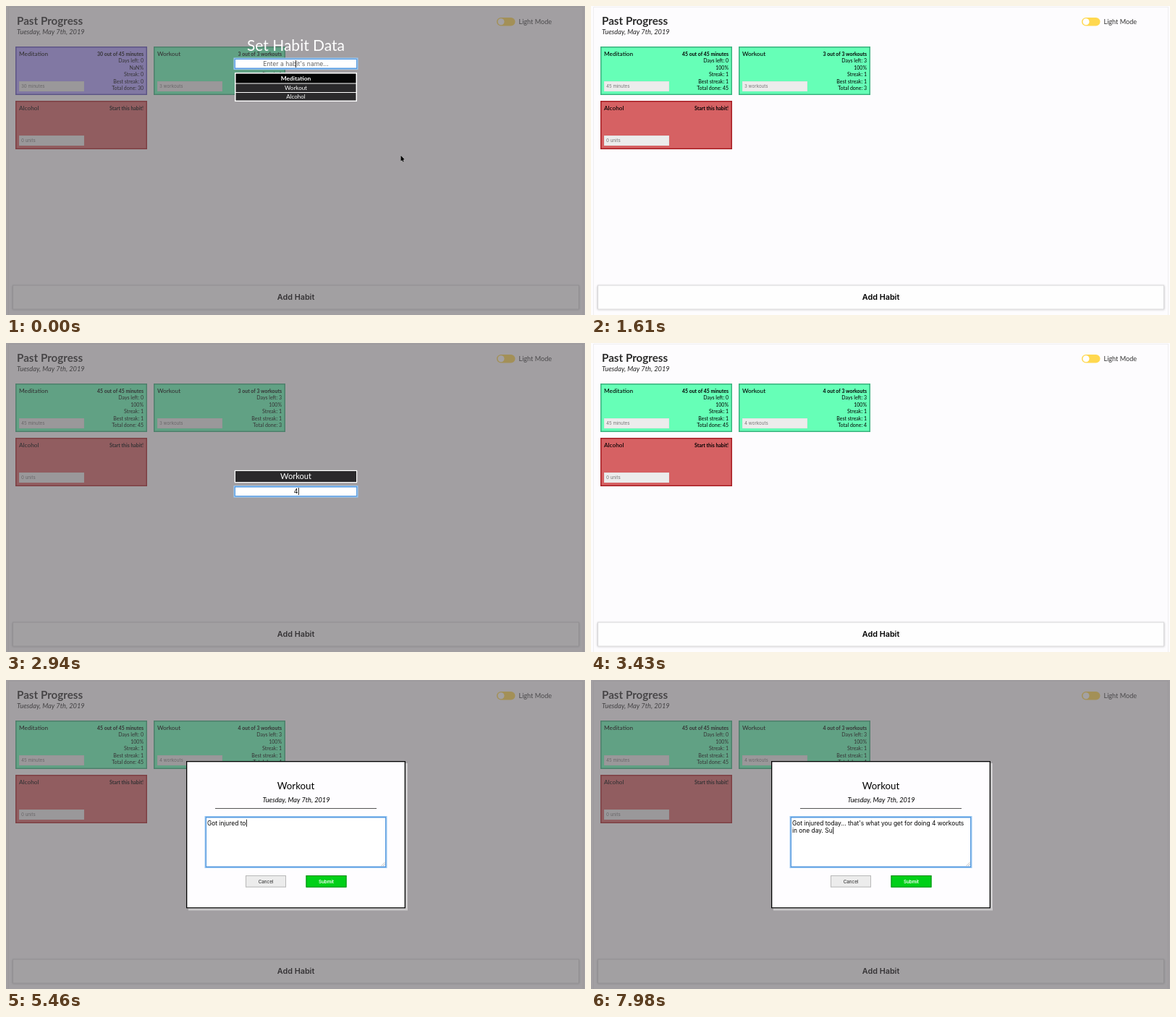
An HTML page with a canvas for the animation above (8000 ms loop, 800 px wide and 427 px high).

```html
<!DOCTYPE html>
<html lang="en">
<head>
<meta charset="utf-8">
<title>Habit tracker</title>
<style>
html, body { margin: 0; width: 100%; height: 100%; overflow: hidden; background: #fdfcfe; }
canvas { display: block; }
</style>
</head>
<body>
<canvas id="stage" width="800" height="427"></canvas>
<script>
const ctx = document.getElementById('stage').getContext('2d');
const LOOP = 8000;
const HEAD = 'Lato, sans-serif', UI = 'Inter, sans-serif';
const DATE = 'Tuesday, May 7th, 2019';
const NOTE = "Got injured today... that's what you get for doing 4 workouts\nin one day. Su";
const GREEN = [102, 255, 183], GREEN_EDGE = [58, 178, 126];
const PURPLE = [176, 160, 255], PURPLE_EDGE = [92, 78, 186];
const RED = [214, 97, 99], RED_EDGE = [168, 30, 36];

const ramp = (t, from, to) => Math.min(1, Math.max(0, (t - from) / (to - from)));
const mix = (a, b, k) => a.map((v, i) => v + (b[i] - v) * k);
const rgb = c => `rgb(${c.map(Math.round)})`;

function text(str, x, y, size, { font = HEAD, style = '', color = '#000', align = 'left' } = {}) {
  ctx.font = `${style} ${size}px ${font}`;
  ctx.fillStyle = color;
  ctx.textAlign = align;
  ctx.fillText(str, x, y);
}

function box(x, y, w, h, fill, edge, line = 1) {
  if (fill) {
    ctx.fillStyle = fill;
    ctx.fillRect(x, y, w, h);
  }
  if (edge) {
    ctx.strokeStyle = edge;
    ctx.lineWidth = line;
    ctx.strokeRect(x + line / 2, y + line / 2, w - line, h - line);
  }
}

function card(x, y, name, fill, edge, amount, lines) {
  box(x, y, 182, 67, rgb(fill), rgb(edge), 1.5);
  text(name, x + 5, y + 13, 8.25, { style: '500' });
  lines.forEach((s, i) => text(s, x + 177, y + 12.7 + i * 9.5, i ? 7 : 6.9,
    { style: i ? '' : 'bold', align: 'right' }));
  box(x + 5, y + 48, 90, 14, '#ececec', '#dedede', 0.5);
  text(amount, x + 8, y + 57.3, 6.2, { font: UI, color: '#777' });
}

const stats = (done, goal, unit, left, percent, streak) => [
  `${done} out of ${goal} ${unit}`, `Days left: ${left}`, `${percent}%`,
  `Streak: ${streak}`, `Best streak: ${streak}`, `Total done: ${done}`];

function page(t) {
  ctx.fillStyle = '#fdfcfe';
  ctx.fillRect(0, 0, 800, 427);
  ctx.strokeStyle = '#efeef0';
  ctx.lineWidth = 1;
  ctx.strokeRect(3.5, 1.5, 794, 440);

  text('Past Progress', 15, 25.7, 15.2, { style: 'bold', color: '#2c2c2c' });
  text(DATE, 15, 39, 9.25, { style: 'italic', color: '#222' });

  ctx.fillStyle = '#ffd84f';
  ctx.beginPath();
  ctx.roundRect(678, 16, 25.5, 11.5, 5.75);
  ctx.fill();
  ctx.fillStyle = '#fff';
  ctx.beginPath();
  ctx.arc(684, 21.7, 4.5, 0, 7);
  ctx.fill();
  text('Light Mode', 708.5, 24.7, 9.1, { color: '#333' });

  const k = ramp(t, 1400, 1610), met = t >= 1470;
  const minutes = met ? 45 : 30, workouts = t >= 3220 ? 4 : 3;
  card(13, 56, 'Meditation', mix(PURPLE, GREEN, k), mix(PURPLE_EDGE, GREEN_EDGE, k), `${minutes} minutes`,
    stats(minutes, 45, 'minutes', 0, met ? 100 : 'NaN', met ? 1 : 0));
  card(204, 56, 'Workout', GREEN, GREEN_EDGE, `${workouts} workouts`,
    stats(workouts, 3, 'workouts', 3, 100, 1));
  card(13, 131, 'Alcohol', RED, RED_EDGE, '0 units', ['Start this habit!']);

  ctx.shadowColor = 'rgba(0,0,0,.25)';
  ctx.shadowBlur = 3;
  box(9, 385.5, 783, 34, '#fefefe');
  ctx.shadowColor = 'transparent';
  box(9, 385.5, 783, 34, null, '#d8d7d9');
  text('Add Habit', 400.5, 406, 10.8, { font: UI, style: '600', align: 'center' });
}

function focusBox(x, y, w, h) {
  box(x - 1, y - 1, w + 2, h + 2, '#9cc9f3');
  box(x, y, w, h, '#fff', '#5599df', 1.5);
}

function caret(x, y) {
  ctx.fillStyle = '#222';
  ctx.fillRect(x, y, 1, 10);
}

function habitList(selected) {
  text('Set Habit Data', 400.5, 62, 21, { color: '#fff', align: 'center' });
  focusBox(315.5, 72.5, 170, 14.5);
  text("Enter a habit's name...", 400.5, 82.8, 8.6, { font: UI, color: '#666', align: 'center' });
  caret(400, 75);
  box(316, 92, 169, 40, '#fff');
  ['Meditation', 'Workout', 'Alcohol'].forEach((name, i) => {
    const on = i === selected, top = [93.5, 107.5, 120][i], bottom = [106.5, 119, 130.5][i];
    box(317.5, top, 166, bottom - top, on ? '#050505' : '#2a292b');
    text(name, 400.5, (top + bottom) / 2 + 3, on ? 8.4 : 8,
      { style: on ? 'bold' : '', color: '#fff', align: 'center' });
  });
}

function amountEntry(name, value) {
  box(315.5, 175.5, 170, 18, '#2a292b', '#fff', 1.5);
  text(name, 400.5, 188, 11.1, { color: '#fff', align: 'center' });
  focusBox(315.5, 198, 170, 14.5);
  text(value, 400.5, 208.4, 8.8, { font: UI, align: 'center' });
  caret(401 + ctx.measureText(value).width / 2, 200);
}

function noteDialog(t) {
  const added = t < 4870, top = added ? 105 : 112, gap = added ? 13.5 : 0;
  const height = 203.5 + gap, area = top + 77 + gap, buttons = top + 158 + gap;
  box(252, top + 3, 303, height, '#cac8ca');
  box(249, top, 303, height, '#fefdff', '#000', 1.3);
  text('Workout', 400.5, top + 39, 13.3, { align: 'center' });
  text(DATE, 401, top + 57, 9.2, { style: 'italic', align: 'center' });
  if (added) {
    const green = '#08d02c';
    text('Note Added', 384.5, 175, 7.5, { color: green });
    ctx.strokeStyle = green;
    ctx.lineWidth = 1.2;
    ctx.beginPath();
    ctx.moveTo(375, 172.5);
    ctx.lineTo(377.2, 174.8);
    ctx.lineTo(382, 169.5);
    ctx.stroke();
  }
  box(289, top + 65 + gap, 223, 1, '#555');

  focusBox(275.5, area, 250, 70);
  ctx.strokeStyle = '#999';
  ctx.lineWidth = 0.6;
  ctx.beginPath();
  for (const d of [3, 5.5]) {
    ctx.moveTo(524 - d, area + 68);
    ctx.lineTo(524, area + 68 - d);
  }
  ctx.stroke();

  const typed = Math.max(0, Math.floor((t - 4870) / 40.7));
  const lines = NOTE.slice(0, typed).split('\n');
  lines.forEach((s, i) => text(s, 278, area + 11.7 + i * 10.2, 8.4, { font: UI }));
  const width = ctx.measureText(lines.at(-1)).width;
  caret(typed ? 278.5 + width : 280.5, area + 3.7 + (lines.length - 1) * 10.2);

  box(331, buttons, 56, 16.5, '#ececec', '#b8b8b8');
  text('Cancel', 359, buttons + 10.5, 6.3, { font: UI, color: '#222', align: 'center' });
  box(414.5, buttons, 56, 16.5, '#00d018', '#078a16');
  text('Submit', 442.5, buttons + 10.5, 6.2, { font: UI, style: '600', color: '#fff', align: 'center' });
}

function pointer(x, y) {
  ctx.beginPath();
  [[0, 0], [0, 8], [1.8, 6.4], [3, 9], [4.2, 8.4], [3, 6], [5.4, 5.8]]
    .forEach(([dx, dy]) => ctx.lineTo(x + dx, y + dy));
  ctx.closePath();
  ctx.strokeStyle = '#ddd';
  ctx.lineWidth = 0.8;
  ctx.stroke();
  ctx.fillStyle = '#000';
  ctx.fill();
}

function overlay(t) {
  if (t < 250) habitList(0);
  else if (t < 1400) amountEntry('Meditation', '45'.slice(0, (t >= 620) + (t >= 760)));
  else if (t < 2700) habitList(t < 2240 ? 0 : 1);
  else if (t < 3300) amountEntry('Workout', t < 2870 ? '' : '4');
  else noteDialog(t);
}

function draw(t) {
  page(t);
  const shade = 1 - ramp(t, 1080, 1330) + ramp(t, 1700, 1820)
    - ramp(t, 2960, 3080) + ramp(t, 3540, 3750);
  if (shade > 0.001) {
    ctx.globalAlpha = shade;
    box(0, 0, 800, 427, 'rgba(93,91,94,.57)');
    overlay(t);
    ctx.globalAlpha = 1;
  }
  if (t < 70) pointer(545.5, 206.5);
}

const start = performance.now();
function tick() {
  draw((performance.now() - start) % LOOP);
  requestAnimationFrame(tick);
}
tick();
</script>
</body>
</html>
```
